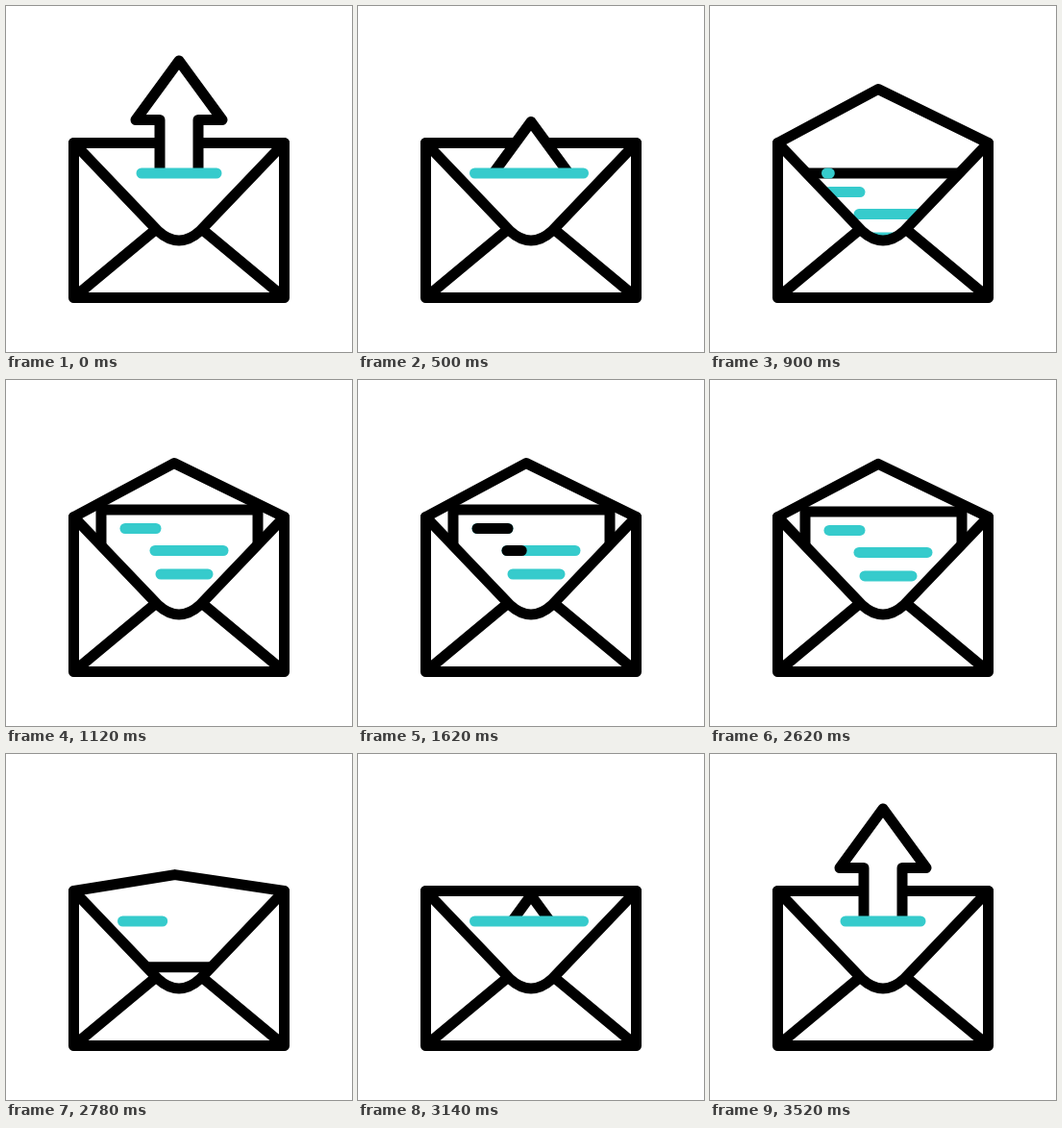
These frames come from a looping animation (360 by 360 pixels, 3600 ms). An HTML page:

```html
<!DOCTYPE html>
<html lang="en">
<head>
<meta charset="utf-8">
<title>Outgoing mail</title>
<style>
  html, body { margin: 0; width: 100%; height: 100%; overflow: hidden; background: #fff; }
  svg { display: block; width: 100%; height: 100%; }
  .ink, .teal { stroke-width: 11; stroke-linecap: round; stroke-linejoin: round; }
  .ink { stroke: #000; fill: #fff; }
  .teal { stroke: #36cbcc; fill: none; }
</style>
</head>
<body>
<svg viewBox="0 0 360 360">
  <defs>
    <clipPath id="pocket"><rect width="360" height="290"/></clipPath>
    <clipPath id="slot"><rect width="360" height="174"/></clipPath>
  </defs>
  <path id="flap" class="ink"/>
  <g clip-path="url(#pocket)">
    <g id="paper">
      <rect class="ink" x="99" y="135" width="163" height="150"/>
    </g>
  </g>
  <path class="ink" d="M70.500 142.500L158 234Q180 254 202 234L289.500 142.500V303.500H70.500Z"/>
  <path class="ink" d="M71 303L154 234M289 303L206 234"/>
  <g clip-path="url(#slot)">
    <path id="arrow" class="ink" d="M180 57L225 118.500H200V190H160V118.500H135Z"/>
  </g>
  <line id="bar" class="teal" y1="174" y2="174"/>
</svg>
<script>
const LOOP = 3600;
const PAPER_DROP = 127, ARROW_DROP = 126;
const $ = id => document.getElementById(id);
const [flap, paper, arrow, bar] = ['flap', 'paper', 'arrow', 'bar'].map($);

const ramp = (t, from, to) => {
  const x = Math.min(1, Math.max(0, (t - from) / (to - from)));
  return x * x * (3 - 2 * x);
};

function addLine(cls, x1, x2, y) {
  const el = document.createElementNS('http://www.w3.org/2000/svg', 'line');
  el.setAttribute('class', cls);
  el.setAttribute('y1', y);
  el.setAttribute('y2', y);
  paper.append(el);
  span(el, x1, x2);
  return el;
}

// Place a horizontal stroke, hiding it when it has no length.
function span(el, x1, x2) {
  el.setAttribute('x1', x1);
  el.setAttribute('x2', x2);
  el.style.display = x2 - x1 > 0.05 ? '' : 'none';
}

let total = 0;
const rows = [[124, 156, 154.5], [155, 226, 177.5], [161, 210, 202]].map(([x1, x2, y]) => {
  addLine('teal', x1, x2, y);
  const row = { x: x1, len: x2 - x1, at: total, el: addLine('ink', x1, x2, y) };
  total += row.len;
  return row;
});

const shift = (el, y) => el.setAttribute('transform', `translate(0 ${y})`);

function draw(t) {
  const open = ramp(t, 680, 880) - ramp(t, 2600, 2885);
  flap.setAttribute('d', `M70.500 142.500L${176 - open} ${142.5 - 56 * open}L289.500 142.500`);

  const lift = ramp(t, 560, 1100) - ramp(t, 2600, 2890);
  shift(paper, PAPER_DROP * (1 - lift));

  const sunk = ramp(t, 280, 720) - ramp(t, 2940, 3510);
  shift(arrow, ARROW_DROP * sunk);

  const wide = ramp(t, 280, 480) - ramp(t, 3220, 3510);
  const shown = 1 - ramp(t, 640, 928) + ramp(t, 2660, 2956);
  const left = 141 - 19.5 * wide, right = 219 + 15.5 * wide;
  span(bar, left, left + (right - left) * shown);

  // A black run travels along the three rows as one path.
  const head = total * ramp(t, 1380, 2030);
  const tail = total * ramp(t, 1610, 2330);
  for (const { x, len, at, el } of rows) {
    span(el, x + Math.max(0, tail - at), x + Math.min(len, head - at));
  }
}

function tick() {
  draw(performance.now() % LOOP);
  requestAnimationFrame(tick);
}
tick();
</script>
</body>
</html>
```
